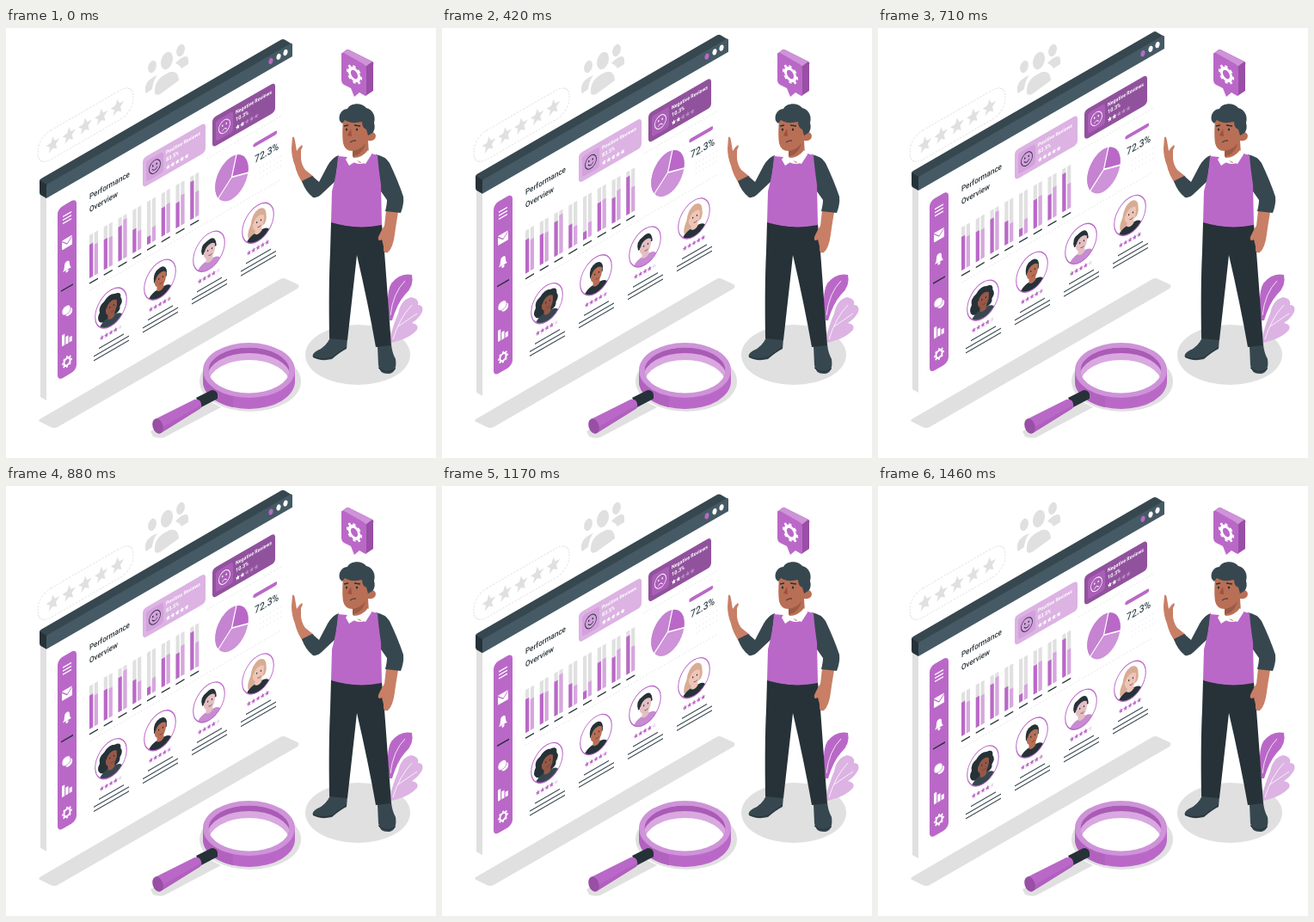
An HTML page for the animation above (1500 ms loop, 500 by 500 pixels).

```html
<!DOCTYPE html>
<html lang="en">
<head>
<meta charset="utf-8">
<title>Performance overview</title>
<style>
html, body { margin: 0; width: 100%; height: 100%; overflow: hidden; background: #fff; }
svg { display: block; width: 500px; height: 500px; }
text { font-family: Roboto, "Open Sans", sans-serif; }
</style>
</head>
<body>
<svg id="stage" viewBox="0 0 500 500"></svg>
<script>
const PURPLE = '#ba68c8', SOFT = '#ce93d8', PALE = '#dcb3e3', DEEP = '#91529d', SHADE = '#a95bb5';
const GRAY = '#e0e0e0', SLATE = '#455a64', DARK = '#37474f', INK = '#263238', WHITE = '#fff';
const SKIN = '#c87f66', FACE = '#b96f55';

const path = (d, fill, extra = '') => `<path d="${d}" fill="${fill}" ${extra}/>`;
const stroke = (d, color, width = 1, extra = '') => path(d, 'none', `stroke="${color}" stroke-width="${width}" ${extra}`);
const oval = (x, y, rx, ry, fill, extra = '') =>
  `<ellipse cx="${x}" cy="${y}" rx="${rx}" ry="${ry}" fill="${fill}" ${extra}/>`;
const box = (x, y, w, h, fill, r = 0, extra = '') =>
  `<rect x="${x}" y="${y}" width="${w}" height="${h}" rx="${r}" fill="${fill}" ${extra}/>`;
const group = (transform, ...parts) => `<g transform="${transform}">${parts.join('')}</g>`;
const label = (x, y, size, str, fill, weight = 500) => group(`translate(${x} ${y}) scale(.866 1)`,
  `<text font-size="${size}" font-weight="${weight}" fill="${fill}">${str}</text>`);
const list = (n, draw) => Array.from({ length: n }, (_, i) => draw(i)).join('');

// Wall-plane drawings: x is the screen x, y is measured along the rising 30 degree slope.
const wall = (...parts) => group('skewY(-30)', ...parts);

function star(x, y, r, fill) {
  const points = Array.from({ length: 10 }, (_, i) => {
    const a = i * Math.PI / 5, d = i % 2 ? r * .45 : r;
    return `${(x + .87 * d * Math.sin(a)).toFixed(1)},${(y - d * Math.cos(a)).toFixed(1)}`;
  });
  return `<polygon points="${points.join(' ')}" fill="${fill}"/>`;
}

const stars = (x, y, step, r, full, on, off) => list(5, i => star(x + i * step, y, r, i < full ? on : off));

const gear = r =>
  `<circle r="${r * .65}" fill="none" stroke="#fff" stroke-width="${r * .36}"/>` +
  `<circle r="${r * .9}" fill="none" stroke="#fff" stroke-width="${r * .26}" pathLength="16" stroke-dasharray="1" stroke-dashoffset=".5"/>`;

const backdrop = () =>
  path('M39 455L319 292Q322 290 326 292L339 298Q342 300 339 303L60 464Q56 466 52 464L40 458Q37 457 39 455Z', GRAY) +
  wall(
    box(37, 149, 111, 34, WHITE, 15, `stroke="${GRAY}" stroke-dasharray="2 1.5"`),
    stars(54.5, 167, 18.75, 9.4, 5, GRAY)) +
  oval(187, 38, 6.6, 10.5, GRAY, 'transform="rotate(18 187 38)"') +
  oval(203, 26, 4.6, 7.4, GRAY, 'transform="rotate(18 203 26)"') +
  oval(170, 45, 4.6, 7.4, GRAY, 'transform="rotate(18 170 45)"') +
  path('M173 76C172 63 179 57 187 53C195 48 201 52 201 61L179 77Q174 79 173 76Z', GRAY) +
  path('M197 41C201 36 212 28 212 37L212 42L204 47Q202 43 197 41Z', GRAY) +
  path('M162 74C161 64 166 59 176 55Q171 61 170 71L163 76Z', GRAY);

const sidebar = () => box(60, 245, 22, 200, PURPLE, 6) +
  list(3, i => stroke(`M66 ${257.7 + i * 4}H76`, WHITE, 1.5)) +
  box(65, 285, 12, 11, WHITE, 1) + stroke('M65 286L71 292L77 286', PURPLE) +
  path('M66 322Q68 320 68 316Q68 312 71 312Q74 312 74 316Q74 320 76 322Z', WHITE) + oval(71, 323.5, 1.6, 1.6, WHITE) +
  stroke('M64 343H78', INK, 1.6) +
  oval(73, 372, 4.2, 4.5, WHITE) + oval(70, 368.5, 5, 5.2, WHITE, `stroke="${PURPLE}" stroke-width=".6"`) +
  box(65, 395, 3.2, 13, WHITE) + box(69.3, 399, 3.2, 9, WHITE) + box(73.6, 402, 3.2, 6, WHITE) +
  group('translate(71 429) scale(.87 1)', gear(6.5));

function card(x, fill, title, value, full, happy) {
  const mouth = happy ? 'M-3.5 1.5Q0 6 3.5 1.5' : 'M-3 4.5Q0 .5 3 4.5';
  const line = happy ? INK : WHITE;
  return box(x, 243.5, 73, 34.5, fill, 4.5) +
    box(x + 4, 249, 20, 24, happy ? SOFT : PURPLE, 3, 'opacity=".6"') +
    group(`translate(${x + 14} 261) scale(.87 1)`,
      stroke('M-7.5 0A7.5 7.5 0 1 1 7.5 0A7.5 7.5 0 1 1-7.5 0', line, .9),
      stroke(mouth, line, .9), oval(-2.6, -2, .9, 1.1, line), oval(2.6, -2, .9, 1.1, line)) +
    label(x + 27, 254.5, 6.1, title, WHITE, 600) +
    label(x + 27, 263, 6.4, value, WHITE, 600) +
    stars(x + 29.5, 270.5, 5.4, 3.1, full, WHITE, happy ? WHITE : '#b98ac2');
}

// Height of the two filled columns in each pair.
const columns = [[39, 36], [35, 34], [40, 45], [27, 22], [9, 17], [33, 34], [29, 35], [44, 29]];
const chart = () => columns.map((pair, i) => {
  const x = 97 + i * 16.75;
  return pair.map((h, k) =>
    box(x + k * 5.8, 297, 4.2, 50, GRAY) +
    box(x + k * 5.8, 347 - h, 4.2, h, k ? '#d7a6df' : PURPLE)).join('') +
    stroke(`M${x} 353h10`, INK, 1.5);
}).join('');

const pie = () => group('translate(262.5 326) scale(.78 1)',
  `<circle r="24.7" fill="${SOFT}"/>`,
  path('M0 0L-20 14.5A24.7 24.7 0 0 1 7-23.7Z', '#c583d1'),
  path('M1-1L7-23.7A24.7 24.7 0 0 1 24.2 5Z', PURPLE),
  stroke('M-20.5 15L0-1L7.2-24.5M0-1L25 5', WHITE, 1.7));

const portraits = [
  { skin: '#955848', hair: INK, shirt: DARK,
    back: 'M-14 10Q-20 4-15-2Q-17-10-9-12Q-3-18 5-14Q14-13 13-6Q17 0 12 4Q13 9 7 10L-8 13Z' },
  { skin: '#b86f55', hair: INK, shirt: INK, back: 'M-8 0Q-10-14 0-14Q10-14 9 0Z' },
  { skin: '#e3bfc3', hair: INK, shirt: '#c78bd2', back: 'M-9 0Q-13-12-3-13Q9-17 10-2Z' },
  { skin: '#eec5b8', hair: '#d8ac94', shirt: INK,
    back: 'M-13 12Q-15 5-10-2Q-8-15 1-16Q11-15 11-4Q12 2 9 5L-6 10Z' }
];

const portrait = ({ skin, hair, shirt, back }, i) => group(`translate(${122 + i * 57} 396) scale(.87 1)`,
  `<circle r="21" fill="#fff"/>`,
  `<g clip-path="url(#disc)">`,
  path(back, hair),
  path('M-17 22Q-17 12-6 10L6 10Q17 11 17 22Z', shirt),
  path('M-4 3H5V11Q1 15-4 11Z', skin),
  path('M-7-7Q0-11 8-7V0Q7 8 1 8Q-7 7-7 0Z', skin),
  path('M-8-2Q-9-13 1-13Q9-13 9-4Q6-8 2-8Q-4-8-6-2Z', hair),
  oval(-1.5, -1.5, .8, 1, INK), oval(4, -1.5, .8, 1, INK),
  stroke('M-.5 4.5Q1.5 6 4 4.5', '#713d3c', .8),
  `</g>`,
  `<circle r="21" fill="none" stroke="${PURPLE}" stroke-width="1.2"/>`);

const review = (who, i) => {
  const x = 122 + i * 57;
  return portrait(who, i) +
    stars(x - 10.5, 424.5, 5.3, 3.1, [4, 4, 4, 5][i], PURPLE, i === 1 ? SOFT : '#ecdcef') +
    stroke(`M${x - 14} 435h29M${x - 20} 440.7h41M${x - 20} 445.7h41`, DARK, 1.25);
};

const browser = () =>
  path('M40 190L47 194V433L40 429Z', GRAY) +
  path('M47 194L333 29V268L47 433Z', WHITE) +
  path('M39 178Q39 176 41 175L320 13.6Q322 12.5 324 13.6L333 19L47 184Z', DARK) +
  path('M39 177L47 182V198L40 194Q39 193 39 191Z', INK) +
  path('M47 184Q47 182 49 181L331 18Q333 17 333 20V33L47 198Z', SLATE) +
  [[308, 38.5, PURPLE], [317, 33.3, WHITE], [325, 28.5, WHITE]]
    .map(([x, y, c]) => oval(x, y, 2.4, 3.7, c, `transform="rotate(15 ${x} ${y})"`)).join('') +
  wall(
    sidebar(),
    label(97, 255.5, 9.3, 'Performance', INK),
    label(97, 270.5, 9.3, 'Overview', INK),
    card(159, PALE, 'Positive Reviews', '83.5%', 5, true),
    card(240, DEEP, 'Negative Reviews', '10.3%', 2, false),
    stroke('M97 361H320M234 287H320', GRAY, .7, 'stroke-dasharray="1.5 2"'),
    list(3, i => stroke(`M295 ${333 + i * 6}H320`, GRAY, .7, 'stroke-dasharray="1 3"')),
    chart(), pie(),
    stroke('M289.5 303H313', PURPLE, 4.4, 'stroke-linecap="round"'),
    label(289, 324, 12, '72.3%', DARK),
    portraits.map(review).join(''));

const magnifier = () =>
  oval(284, 411, 59, 35, GRAY) +
  path('M168 469L236 434L250 441L184 476Q178 478 171 475Z', GRAY) +
  path('M229 398V411A53.5 32 0 0 0 336 411V398Z', PURPLE) +
  path('M229 398V411A53.5 32 0 0 0 264 441V398Z', '#b162bf') +
  oval(282.5, 398, 53.5, 32, SOFT) +
  `<g clip-path="url(#lens)">` +
  oval(282.5, 398, 47, 26.5, SHADE) + oval(282.5, 405, 48, 27, '#d9a8e0') + oval(282.5, 413, 47, 27, WHITE) +
  `</g>` +
  path('M221 430L239 421Q245 421 246 426V431L227 441Z', INK) +
  path('M173 455L219 432Q226 431 227 437Q228 441 225 443L180 471Z', PURPLE) +
  path('M182 464L227 438Q228 441 225 443L180 471Z', '#b060bd') +
  oval(176.5, 463, 6, 9, '#984fa5', 'transform="rotate(-18 176.5 463)"');

const bubble = () =>
  path('M390 30L395 26Q397 24 400 26L426 39Q428 40 427 43V73L418 79Z', '#984fa5') +
  path('M390 30L395 26Q397 24 400 26L426 39L418 45Z', SOFT) +
  path('M390 31Q390 28 393 29L416 42Q419 44 419 47V77Q419 80 416 78L411 75L405 80L401 70L393 66Q390 64 390 61Z', PURPLE) +
  group('matrix(.87 .5 0 1 405 54)', gear(10));

const plant = () =>
  path('M446 340Q441 310 448 297Q458 284 472 287Q475 300 464 310Q455 320 449 340Z', PURPLE) +
  stroke('M447 334Q450 308 464 294', WHITE, .8) +
  path('M445 367Q450 345 456 332Q459 316 471 313Q481 315 479 322Q486 322 484 330Q480 338 472 343Q481 345 478 351Q470 360 455 364Z', PALE) +
  stroke('M450 362Q457 338 472 322M456 347L478 332', WHITE, .8);

const man = () =>
  oval(409, 380, 61, 35, GRAY) + plant() +
  path('M377 360L397 361L396 373Q388 377 379 385Q366 388 357 383Q355 379 362 375Q372 371 377 360Z', DARK) +
  path('M432 370L448 368Q449 378 453 385Q455 400 446 402Q434 403 433 392Z', DARK) +
  stroke('M357 382Q367 387 379 383L396 371M433 395Q442 404 453 396', INK) +
  path('M378 225Q408 235 437 228L440 260L448 369L430 371Q421 320 408 264Q403 310 397 363L376 361Q375 300 377 260Z', INK) +
  path('M442 212L456 214Q453 232 452 240Q450 256 444 261Q438 263 439 254L437 246Q432 249 433 243Q437 234 440 230Z', SKIN) +
  path('M430 147Q441 149 446 157Q456 178 462 196Q463 205 459 215L441 213Q443 205 443 200L436 190Q431 165 430 147Z', DARK) +
  path('M333 127Q335 125 336 131L338 143Q340 139 344 136Q346 137 343 142L343 152Q344 160 348 165L358 173L346 182Q338 170 336 160Q332 150 332 140Z', SKIN) +
  path('M387 148Q380 150 374 160L364 179L356 172L344 178Q348 190 357 197Q362 198 366 194L383 178Z', DARK) +
  path('M386 149L397 150Q406 161 417 157L425 146L432 148Q433 162 436 182L437 229Q408 235 378 226L379 190Q385 168 386 149Z', PURPLE) +
  path('M392 106C391 118 391 128 392 134Q394 143 403 143V150L412 157L422 147L421 131Q430 132 430 125Q428 119 422 122L421 106Z', FACE) +
  path('M403 143Q412 142 418 134Q414 148 403 149Z', '#9a5a44') +
  path('M400 145L395 153L399 160L408 154L418 158L425 147L421 142Q414 151 404 151Z', WHITE) +
  path('M391 111Q386 108 388 101Q391 94 397 94C400 87 414 86 419 93C427 95 430 103 428 110Q430 118 426 122L421 125L419 118Q414 116 414 109Q401 112 394 107Z', DARK) +
  stroke('M393 114L398 113M405 113L412 114', INK, 1.3) +
  oval(396, 118, 1.2, 1.6, INK) + oval(408, 118, 1.2, 1.6, INK) +
  path('M401 117L397 125L402 126Z', '#9c4f42') +
  stroke('M400 133Q404 130 407 131', INK);

document.getElementById('stage').innerHTML =
  `<defs><clipPath id="disc"><circle r="21"/></clipPath>
  <clipPath id="lens">${oval(282.5, 398, 47, 26.5, WHITE)}</clipPath></defs>` +
  backdrop() + `<g id="browser">${browser()}</g>` + magnifier() + bubble() + man();

const floating = document.getElementById('browser');
const LOOP = 1500, RISE = 9;

function frame() {
  const phase = performance.now() % LOOP / LOOP;
  const y = -RISE * (1 - Math.cos(2 * Math.PI * phase)) / 2;
  floating.setAttribute('transform', `translate(0 ${y.toFixed(2)})`);
  requestAnimationFrame(frame);
}
frame();
</script>
</body>
</html>
```
